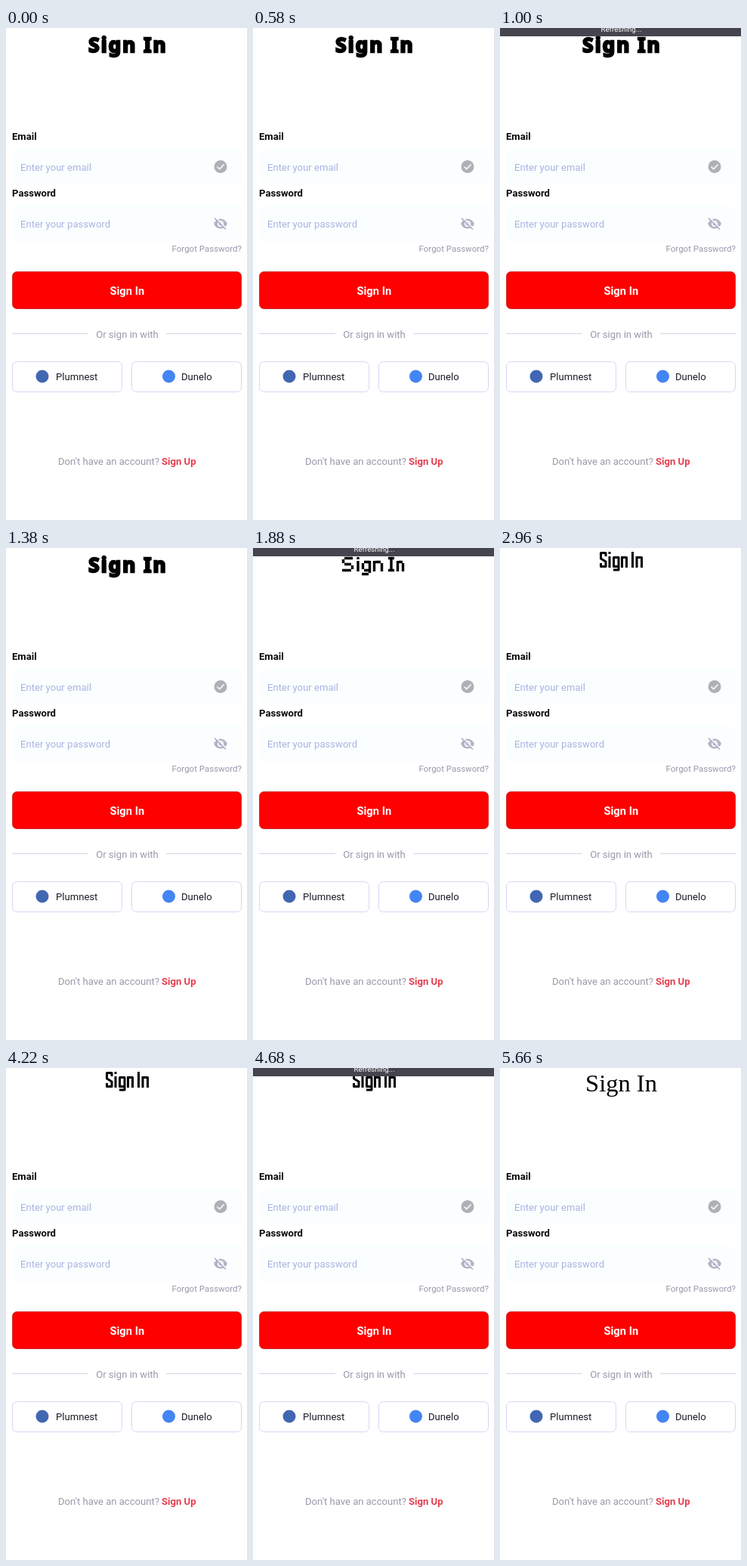
An HTML page that plays this animation: 319x651 px, repeating every 5680 ms.

```html
<!DOCTYPE html>
<html lang="en">
<head>
<meta charset="utf-8">
<title>Sign In</title>
<style>
  html, body { margin: 0; width: 100%; height: 100%; overflow: hidden; background: #fff; }
  svg { display: block; width: 319px; height: 651px; font: 13.1px Roboto, sans-serif; }
  .label { font-weight: 600; fill: #0c0c0c; }
  .hint { fill: #a8b3e2; }
  .field { fill: #fbfefe; }
  .soft { fill: #9898ac; }
  .box { fill: #fff; stroke: #d8d6f3; }
  .mid { text-anchor: middle; }
  .heavy { font: 900 26px "Noto Sans", sans-serif; letter-spacing: 2.1px; stroke: #000; stroke-width: 2.4; }
  .drawn { fill: none; stroke: #000; }
  .title { display: none; }
</style>
</head>
<body>
<svg viewBox="0 0 319 651">
  <text class="title mid heavy" x="161.5" y="31.7">Sign In</text>
  <g class="title drawn" stroke-width="3.4" role="img" aria-label="Sign In">
    <path d="M132 13.5H121M119.5 15v5M121 21.5h9M131.5 23v5M130 29.5H118"/>
    <path d="M139 12v3M139 17v14M155 18.5h-8M145.5 20v8M147 29.5h8M154.5 17v16M153 34.5h-9"/>
    <path d="M160.5 17v14M162 18.5h7M170.5 20v11"/>
    <path d="M179 13.5h8M183 13v17M179 29.5h8M191.5 17v14M193 18.5h5M198.5 20v11"/>
  </g>
  <g class="title drawn" stroke-width="3" stroke-linejoin="round" role="img" aria-label="Sign In">
    <path d="M140 11V6.5H133.5V14L140 18V24.5H133.5V20"/>
    <path d="M145 5v3M145 11v15M157 24.5H150.5V12.5H157V29H150"/>
    <path d="M161.5 26V11M161.5 12.5H167.5V26"/>
    <path d="M175.5 5V26M181 26V11M181 12.5H187.5V26"/>
  </g>
  <text class="title mid" x="160.5" y="30.5" font-family="Liberation Serif, serif" font-size="32.5">Sign In</text>

  <text class="label" x="8" y="147.5">Email</text>
  <rect class="field" x="8" y="159" width="304" height="49" rx="10"/>
  <text class="hint" x="19" y="188.5">Enter your email</text>
  <circle cx="284" cy="183.5" r="8.5" fill="#b0b0b4"/>
  <path d="M279.5 183.5l3.2 3.2 6-6.4" fill="none" stroke="#eef1ff" stroke-width="1.7"/>

  <text class="label" x="8" y="222.5">Password</text>
  <rect class="field" x="8" y="234" width="304" height="49" rx="10"/>
  <text class="hint" x="19" y="263.5">Enter your password</text>
  <g fill="#b4b4c6">
    <path d="M275 259Q278 252.5 284 252.5T293 259Q290 265.5 284 265.5T275 259"/>
    <circle cx="284" cy="259" r="4" fill="#fff"/>
    <circle cx="284" cy="259" r="2.4"/>
    <path d="M277.5 251l15 15" stroke="#fff" stroke-width="1.6"/>
    <path d="M276 251.5l15 15" stroke="#adadc9" stroke-width="1.6"/>
  </g>
  <text class="soft" x="312" y="296" font-size="11.5" text-anchor="end">Forgot Password?</text>

  <rect x="8.5" y="322.5" width="303" height="49" rx="6" fill="#f00" stroke="#c33"/>
  <text class="mid" x="160.3" y="353" font-size="14.7" font-weight="700" fill="#fff">Sign In</text>

  <path d="M8 404.5H109M212 404.5H312" stroke="#d4d4e8"/>
  <text class="soft mid" x="160.5" y="409.5">Or sign in with</text>

  <rect class="box" x="8.5" y="441.5" width="145" height="40" rx="6"/>
  <circle cx="48" cy="461" r="8.5" fill="#4267b2"/>
  <text x="66" y="466" fill="#1c1c28">Plumnest</text>
  <rect class="box" x="166.5" y="441.5" width="145" height="40" rx="6"/>
  <circle cx="215.5" cy="461" r="8.5" fill="#4285f4"/>
  <text x="232" y="466" fill="#1c1c28">Dunelo</text>

  <text class="soft" x="69" y="578">Don't have an account?</text>
  <text x="206" y="578" font-weight="700" fill="#e43d4f">Sign Up</text>

  <g id="banner">
    <rect width="319" height="11" fill="#46454f"/>
    <text class="mid" x="160.5" y="4.5" font-size="9.7" fill="#fff">Refreshing...</text>
  </g>
</svg>
<script>
  const LOOP = 5680;
  const titleStarts = [0, 1520, 2640, 5040];
  const refreshes = [720, 1840, 4360];
  const REFRESH_TIME = 340;
  const titles = document.querySelectorAll('.title');
  const banner = document.getElementById('banner');
  const show = (el, on) => { el.style.display = on ? 'inline' : 'none'; };

  function draw(now) {
    const t = now % LOOP;
    const current = titleStarts.filter(s => t >= s).length - 1;
    titles.forEach((el, i) => show(el, i === current));
    show(banner, refreshes.some(s => t >= s && t < s + REFRESH_TIME));
  }

  const start = performance.now();
  function tick() {
    draw(performance.now() - start);
    requestAnimationFrame(tick);
  }
  tick();
</script>
</body>
</html>
```
